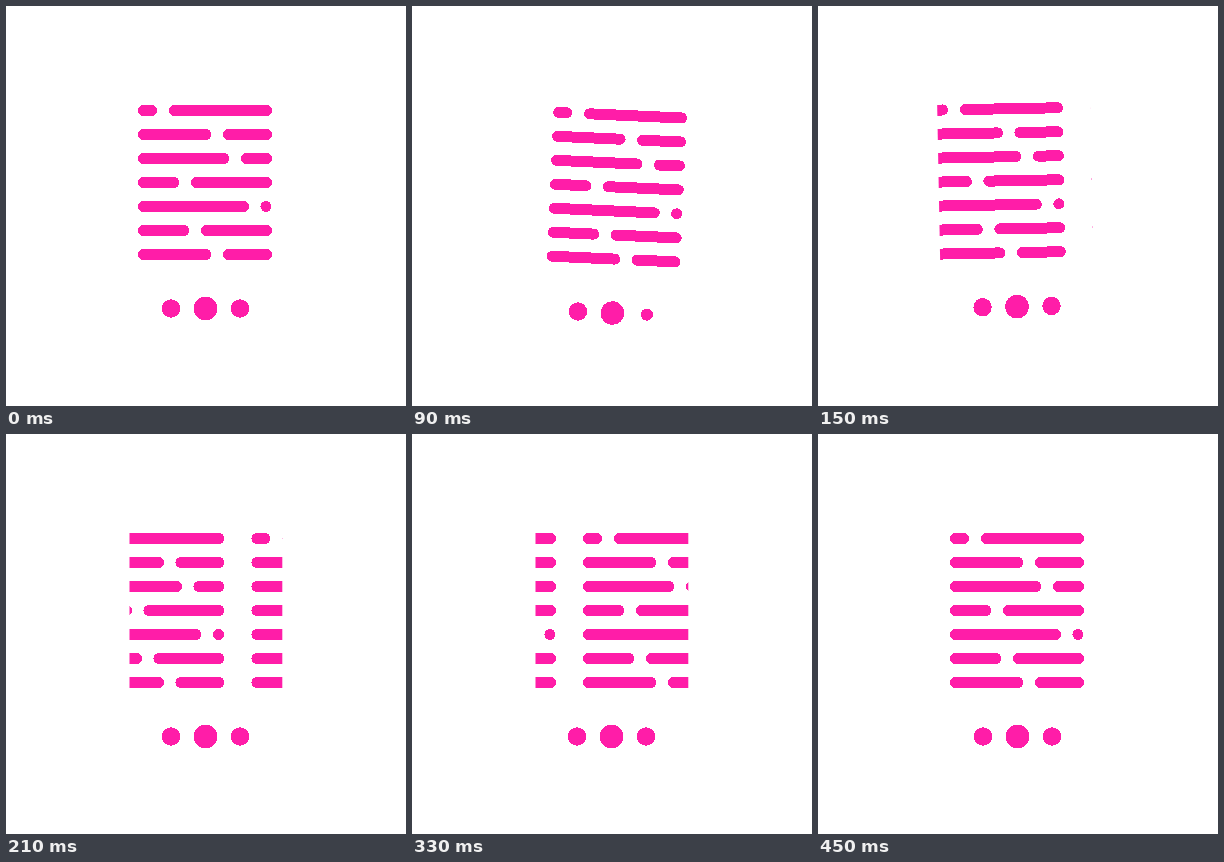
These frames come from a looping animation (400 px wide and 400 px high, 510 ms). An HTML page without scripts:

```html
<!DOCTYPE html>
<html lang="en">
<head>
<meta charset="utf-8">
<title>Page swipe</title>
<style>
  @property --ms { syntax: "<number>"; inherits: true; initial-value: 0; }

  html, body { margin: 0; height: 100%; overflow: hidden; background: #fff; }

  svg {
    display: block;
    width: 100%;
    height: 100%;
    fill: #ff1da8;
    shape-rendering: crispEdges;
    animation: clock 510ms steps(17) infinite;

    /* linear progress of each phase */
    --press-t: clamp(0, (var(--ms) - 15) / 75, 1);
    --release-t: clamp(0, (var(--ms) - 90) / 60, 1);
    --settle-t: clamp(0, (var(--ms) - 150) / 60, 1);
    --slide-t: clamp(0, (var(--ms) - 75) / 375, 1);

    /* smoothstep easing */
    --press: var(--press-t) * var(--press-t) * (3 - 2 * var(--press-t));
    --release: var(--release-t) * var(--release-t) * (3 - 2 * var(--release-t));
    --settle: var(--settle-t) * var(--settle-t) * (3 - 2 * var(--settle-t));
    --slide: var(--slide-t) * var(--slide-t) * (3 - 2 * var(--slide-t));
  }
  @keyframes clock { from { --ms: 0; } to { --ms: 510; } }

  .device {
    transform-origin: 100px 325px;
    transform: rotate(calc(2.6deg * (var(--press)) - 3.7deg * (var(--release)) + 1.1deg * (var(--settle))));
  }
  .pages { transform: translateX(calc(-161px * (var(--slide)))); }
  .button {
    transform-origin: 234px 302.5px;
    transform: scale(calc(1 - (var(--press)) / 3 + (var(--release)) / 3));
  }
  .lines { fill: none; stroke: #ff1da8; stroke-width: 11; stroke-linecap: round; }
</style>
</head>
<body>
<svg viewBox="0 0 400 400">
  <defs>
    <clipPath id="screen"><rect x="123.5" y="80" width="152.8" height="190"/></clipPath>
    <path id="page" class="lines" d="
      M137.5 104.5H145.5 M168.5 104.5H260.5
      M137.5 128.5H200 M222.5 128.5H260.5
      M137.5 152.5H218 M240.5 152.5H260.5
      M137.5 176.5H168 M190.5 176.5H260.5
      M137.5 200.5H237.5 M260 200.5h.01
      M137.5 224.5H178 M200.5 224.5H260.5
      M137.5 248.5H200 M222.5 248.5H260.5"/>
  </defs>
  <g class="device">
    <g clip-path="url(#screen)">
      <g class="pages">
        <use href="#page"/>
        <use href="#page" x="161"/>
      </g>
    </g>
    <circle cx="165" cy="302.5" r="9.2"/>
    <circle cx="199.5" cy="302.5" r="11.8"/>
    <circle class="button" cx="234" cy="302.5" r="9.2"/>
  </g>
</svg>
</body>
</html>
```
